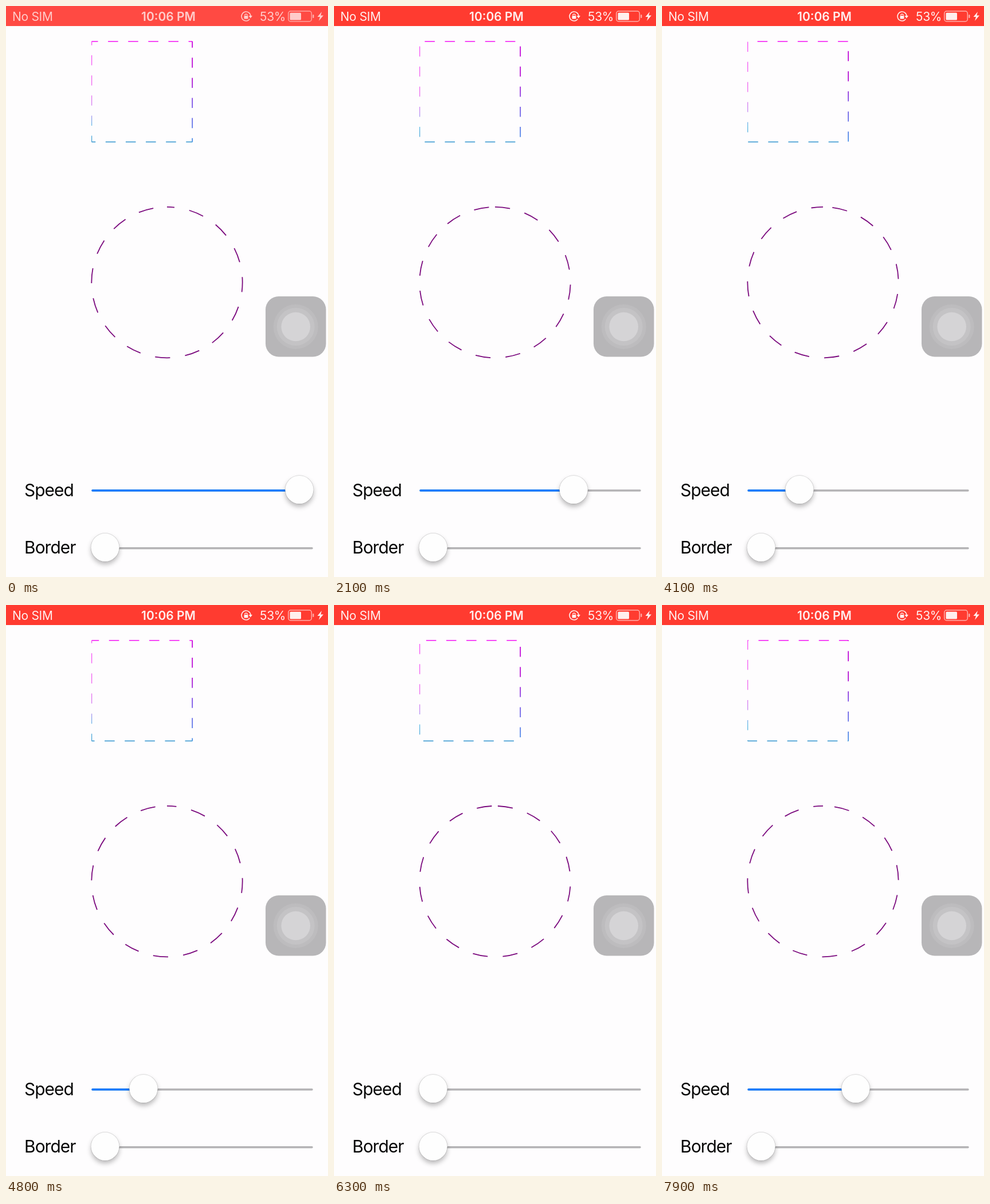
An HTML page with a canvas for the animation above (8 s loop, 562 by 997 pixels).

```html
<!DOCTYPE html>
<html lang="en">
<head>
<meta charset="utf-8">
<title>Dashed borders</title>
<style>
  html, body { margin: 0; width: 562px; height: 997px; overflow: hidden; background: #fefdfe; }
  canvas { display: block; }
</style>
</head>
<body>
<canvas id="stage" width="562" height="997"></canvas>
<script>
const ctx = document.getElementById('stage').getContext('2d');
const TAU = Math.PI * 2, LOOP = 8000, PT = 1.756;
const MIN_X = 173, MAX_X = 512;

// Drags of the speed knob: start ms, end ms, from x, to x
const drags = [
  [500, 950, 512, 442],
  [1300, 2820, 442, 398],
  [3050, 3667, 398, 240],
  [5300, 6207, 240, 173],
  [6400, 7150, 173, 338]
];

// Knob position and dash progress; every drag event restarts the dashes
function stateAt(t) {
  const drag = drags.filter(d => d[0] <= t).pop();
  if (!drag) return { x: MAX_X, progress: 0.747 + t / 3000 };
  const [start, end, from, to] = drag;
  const k = Math.min(1, (t - start) / (end - start));
  const x = from + (to - from) * k * k * (3 - 2 * k);
  const duration = 1000 + 2000 * (x - MIN_X) / (MAX_X - MIN_X);
  const elapsed = t < end ? (t - start) % 80 : t - end;
  return { x, progress: elapsed / duration % 1 };
}

function disc(x, y, r, color) {
  ctx.fillStyle = color;
  ctx.beginPath();
  ctx.arc(x, y, r, 0, TAU);
  ctx.fill();
}

function box(x, y, w, h, r, color) {
  ctx.fillStyle = color;
  ctx.beginPath();
  ctx.roundRect(x, y, w, h, r);
  ctx.fill();
}

function line(x1, y1, x2, y2, color, width) {
  ctx.strokeStyle = color;
  ctx.lineWidth = width;
  ctx.beginPath();
  ctx.moveTo(x1, y1);
  ctx.lineTo(x2, y2);
  ctx.stroke();
}

function text(str, x, y, size, color, weight = 400, spacing = -0.3) {
  ctx.font = `${weight} ${size}px Inter, Roboto, sans-serif`;
  ctx.letterSpacing = spacing + 'px';
  ctx.fillStyle = color;
  ctx.fillText(str, x, y);
}

function vertical(y1, y2, stops) {
  const g = ctx.createLinearGradient(0, y1, 0, y2);
  stops.forEach(([at, color]) => g.addColorStop(at, color));
  return g;
}

function statusBar(t) {
  const dim = Math.max(0, 1 - t / 200);
  ctx.fillStyle = `rgb(255,${59 + 15 * dim},${48 + 19 * dim})`;
  ctx.fillRect(0, 0, 562, 35);
  const ink = `rgba(255,255,255,${0.92 - 0.2 * dim})`;
  text('No SIM', 11, 26, 21, ink);
  text('10:06 PM', 236, 26, 21, ink, 600, 0);
  text('53%', 443, 26, 21, ink);

  // Rotation lock
  ctx.strokeStyle = ink;
  ctx.lineWidth = 1.6;
  ctx.beginPath();
  ctx.arc(419, 18, 8, 0.65, TAU - 0.05);
  ctx.stroke();
  ctx.fillStyle = ink;
  ctx.beginPath();
  ctx.moveTo(423.5, 17);
  ctx.lineTo(430, 17);
  ctx.lineTo(426.8, 21.5);
  ctx.fill();
  box(415.5, 17, 7, 5.5, 1, ink);
  ctx.lineWidth = 1.3;
  ctx.beginPath();
  ctx.arc(419, 16.5, 2.3, Math.PI, 0);
  ctx.stroke();

  // Battery and bolt
  ctx.strokeStyle = `rgba(255,255,255,${0.6 - 0.1 * dim})`;
  ctx.lineWidth = 1.5;
  ctx.beginPath();
  ctx.roundRect(492.8, 9, 40.5, 18, 4);
  ctx.stroke();
  box(495.5, 11.7, 19.5, 12.8, 1.5, ink);
  box(535.2, 15, 2.2, 6, 1, 'rgba(255,255,255,.6)');
  ctx.fillStyle = ink;
  ctx.beginPath();
  [[551, 10], [543.5, 19], [548, 19], [546, 26], [554, 16.5], [549.3, 16.5]]
    .forEach(p => ctx.lineTo(...p));
  ctx.fill();
}

function shapes(progress) {
  const dash = 10 * PT, side = 100 * PT;
  const left = 149.6, top = 61.8, right = left + side, bottom = top + side;
  // A side holds a whole number of dashes, so each one shares the phase
  ctx.setLineDash([dash, dash]);
  ctx.lineDashOffset = 15 * PT * (1 - progress);
  line(left, top, right, top, '#f531f5', 1.7);
  line(right, top, right, bottom, vertical(top, bottom, [
    [0, '#c806dc'], [0.38, '#b312d2'], [0.6, '#7f50e6'], [1, '#4c92e8']]), 1.8);
  line(right, bottom, left, bottom, '#48a0d4', 1.7);
  line(left, bottom, left, top, vertical(top, bottom, [
    [0, '#f84cf8'], [0.5, '#ee6cee'], [0.7, '#c58cf2'], [0.84, '#62bce6'], [1, '#48a0d4']]), 1.3);

  ctx.setLineDash([15 * PT, 15 * PT]);
  ctx.lineDashOffset = 30 * PT * (1 - progress);
  ctx.strokeStyle = '#7b0a7e';
  ctx.lineWidth = 1.8;
  ctx.beginPath();
  ctx.arc(281, 482.6, 75 * PT, -Math.PI / 2, Math.PI * 1.5);
  ctx.stroke();
  ctx.setLineDash([]);
}

function slider(label, y, x) {
  text(label, 32, y + 11, 29.85, '#050505', 400, -0.9);
  ctx.lineCap = 'round';
  line(151, y + 1.5, 534, y + 1.5, '#b4b3b5', 3.5);
  if (x > MIN_X) line(151, y + 1.5, x, y + 1.5, '#0a7aff', 3.5);
  ctx.lineCap = 'butt';
  ctx.save();
  ctx.shadowColor = 'rgba(0,0,0,.28)';
  ctx.shadowBlur = 9;
  ctx.shadowOffsetY = 5;
  disc(x, y, 24.5, '#fff');
  ctx.restore();
  disc(x, y, 25.2, 'rgba(0,0,0,.16)');
  disc(x, y, 24.5, '#fefefe');
}

function touchButton() {
  box(453, 507, 105.5, 105.5, 23, '#b7b6b8');
  disc(505.7, 560, 39, '#bdbcbe');
  disc(505.7, 560, 33, '#c4c3c5');
  disc(505.7, 560, 25.3, '#d5d4d6');
}

function draw(now) {
  const t = now % LOOP;
  const { x, progress } = stateAt(t);
  ctx.fillStyle = '#fefdfe';
  ctx.fillRect(0, 0, 562, 997);
  statusBar(t);
  shapes(progress);
  touchButton();
  slider('Speed', 844.5, x);
  slider('Border', 945.3, MIN_X);
  requestAnimationFrame(draw);
}
requestAnimationFrame(draw);
</script>
</body>
</html>
```
